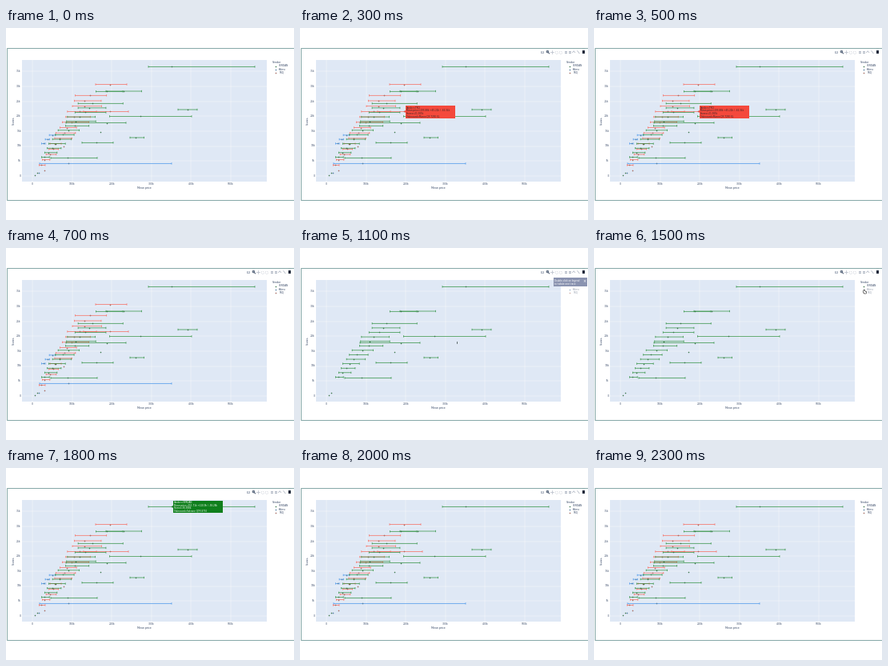
A matplotlib script that plays this animation: 360x240 px, repeating every 2.4 s.

```python
import matplotlib.pyplot as plt
import numpy as np
from matplotlib.animation import FuncAnimation
from matplotlib.collections import LineCollection
from matplotlib.patches import Circle, Polygon, Rectangle

W, H, DPI = 360, 240, 100
INK, PANEL, EDGE = "#3b4c6a", "#dfe8f5", "#86a8a8"
GREEN, RED, BLUE = "#2f9140", "#fa6a5c", "#4a97ea"
ZERO_X, ZERO_Y = 33, 184.8

rng = np.random.default_rng(7)
fig = plt.figure(figsize=(W / DPI, H / DPI), dpi=DPI, facecolor="white")
ax = fig.add_axes([0, 0, 1, 1])
ax.set(xlim=(0, W), ylim=(H, 0))
ax.axis("off")


def px(v):
    return v * 72 / DPI


def text(x, y, s, size=3.0, color=INK, ha="left", z=5, **kw):
    return ax.text(x, y, s, fontsize=px(size), color=color, ha=ha, va="center",
                   family="DejaVu Sans", zorder=z, **kw)


def box(x0, y0, x1, y1, color, z=1):
    return ax.add_patch(Rectangle((x0, y0), x1 - x0, y1 - y0, fc=color,
                                  ec="none", lw=0, zorder=z))


def line(xs, ys, color, width=1.0, z=2):
    return ax.plot(xs, ys, color=color, lw=px(width), zorder=z)[0]


def dots(pts, color, z=5):
    return ax.plot(*zip(*pts), "o", ms=px(1.2), mfc=color, mec="#3a4d48",
                   mew=px(0.25), zorder=z)[0]


def cloud(n, start, end, left, right):
    """Bars (low, mean, high, y) along a line; spread grows with the price."""
    means, ys = np.linspace(start, end, n).T
    means = means + rng.normal(0, 0.04, n) * (means - ZERO_X)
    reach = means - ZERO_X
    low = means - reach * left * rng.uniform(0.8, 1.2, n)
    high = means + reach * right * rng.uniform(0.7, 1.3, n)
    return list(zip(low, means, high, ys))


def series(bars, color, extra=(), z=3):
    segs = []
    for lo, _, hi, y in bars:
        segs.append([(lo, y), (hi, y)])
        segs += [[(x, y - 1.2), (x, y + 1.2)] for x in (lo, hi)]
    bar_lines = LineCollection(segs, colors=color, linewidths=px(0.7), zorder=z)
    bar_lines.set_snap(False)
    ax.add_collection(bar_lines, autolim=False)
    return [bar_lines, dots([(m, y) for _, m, _, y in bars] + list(extra), color, z + 0.5)]


def tooltip(x0, y0, x1, y1, color, ink, tip, rows):
    tx, ty = tip
    arrow = [tip, (x0 + 0.2, ty - 1.7), (x0 + 0.2, ty + 1.7)]
    parts = [box(x0, y0, x1, y1, color, 7),
             ax.add_patch(Polygon(arrow, fc=color, ec="none", zorder=7))]
    step = (y1 - y0 - 0.6) / len(rows)
    parts += [text(x0 + 1.2, y0 + 0.3 + step * (i + 0.5), r, 2.7, ink, z=8)
              for i, r in enumerate(rows)]
    return parts


def modebar():
    grey, dark, y = "#b3bac6", "#4b5a70", 30.2
    parts = [box(301.3, y - 1.4, 304.9, y + 1.4, grey),
             ax.add_patch(Circle((303.1, y), 0.8, fc="white", ec="none", zorder=2)),
             ax.add_patch(Circle((309.4, y - 0.6), 1.3, fc="#9aa5b5", ec=dark,
                                 lw=px(0.8), zorder=2)),
             line([310.3, 311.6], [y + 0.3, y + 1.7], dark),
             line([313.2, 316.8], [y, y], grey, 0.7),
             line([315, 315], [y - 1.8, y + 1.8], grey, 0.7)]
    for x in (320, 325.5):
        parts.append(ax.add_patch(Rectangle((x - 1.5, y - 1.6), 3, 3, fc="none", ec=grey,
                                            lw=px(0.6), ls=":", zorder=2)))
    for x in (332, 337):
        parts.append(box(x - 1.5, y - 1.5, x + 1.5, y + 1.5, grey))
        parts.append(line([x - 0.9, x + 0.9], [y, y], "white", 0.6, 3))
    parts.append(line([340.6, 342.2, 343.8], [y + 0.4, y - 1.4, y + 0.4], grey, 0.8))
    parts.append(line([346.8, 348, 349.2], [y - 1.6, y, y + 1.6], grey, 0.8))
    parts.append(box(352.6, y - 2, 356.4, y + 1.8, "#1f2a3c"))
    return parts


def show(parts, on):
    for p in parts:
        p.set_visible(on)


# panel, grid and axes
box(20, 40, 326, 192, PANEL, 0)
for k in range(8):
    if k < 6:
        x = ZERO_X + 49.6 * k
        line([x, x], [40, 192], "white", 0.4, 1)
        text(x, 195, f"{k}00k" if k else "0", ha="center")
    y = ZERO_Y - 18.65 * k
    line([20, 326], [y, y], "white", 0.4, 1)
    text(18.8, y, f"{5 * k}k" if k else "0", ha="right")
text(173, 200.4, "Mean price", 3.2, ha="center")
text(9.8, 116, "Scores", 3.2, ha="center", rotation=90)

# each vendor: a rising cloud plus its outliers
green_far = [(178, 207, 311, 48.4), (112.5, 126, 146, 79.3), (125, 147, 169.5, 79),
             (215, 227, 239, 102), (129.5, 168, 232, 110.4), (75, 126, 150, 118.5),
             (95, 113, 134, 143.3), (155, 162, 172.5, 137), (56, 77, 114, 162.4)]
red_far = [(112, 130, 151, 70.5), (97, 130, 153, 104.4)]
wide = [(42, 77.5, 207, 169.4)]

series(cloud(13, (48, 161.4), (108, 94.3), 0.24, 0.42) + green_far, GREEN,
       [(38.5, 181), (36, 184.2), (117.5, 130.3)], 4)
others = (series(cloud(3, (47, 144.4), (58, 133.9), 0.15, 0.15) + wide, BLUE,
                 [(40.5, 180.7)])
          + series(cloud(14, (44, 171.4), (104, 84.3), 0.22, 0.35) + red_far, RED,
                   [(48, 178.3), (72, 148.2)]))

# legend
first = [text(333, 43.2, "Vendor", 3.2), text(341, 47.5, "VERDAN"),
         dots([(337, 47.5)], GREEN)]
rest = []
for y, name, color in ((51.6, "Kolmo", BLUE), (55.7, "TRQ", RED)):
    rest += [text(341, y, name), dots([(337, y)], color)]

bar = modebar()
red_tip = tooltip(132, 97, 193.7, 112.6, "#f4493c", "#3b2626", (130, 104.4),
                  ["Vendor=TRQ", "Mean price=195.88k +45.22k / -64.34k",
                   "Scores=21.505k", "Videocard=Maron QX 7250 XL"])
green_tip = tooltip(209, 41, 270.8, 56, "#0f7f1c", "#eef7ee", (207, 48.4),
                    ["Vendor=VERDAN", "Mean price=351.71k +210.9k / -58.28k",
                     "Scores=36.588k", "Videocard=Solvane QTR 8700"])
notice = [box(316.5, 36.6, 359, 48, "#8a93b0", 7),
          text(318.5, 40.8, "Double-click on legend", 2.8, "white", z=8),
          text(318.5, 44.6, "to isolate one trace", 2.8, "white", z=8),
          text(355.2, 41.2, "×", 5, "white", ha="center", z=8)]
speck = [line([196.3, 196.3], [117.4, 119.2], "#3c4a4a", 0.8)]
hand = [ax.add_patch(Polygon([(337.2, 52.3), (338.4, 52.3), (338.6, 54), (340.6, 54.5),
                              (340.2, 57), (337.8, 57), (336.3, 54.8)],
                             fc="white", ec="#222222", lw=px(0.6), zorder=9))]

# window edge
ax.add_patch(Rectangle((0.5, 24.5), 359, 190, fc="none", ec=EDGE, lw=px(1), zorder=10))


def draw(i):
    alone, noted = 9 <= i < 16, 9 <= i < 14
    show(others, not alone)
    show(bar, 1 <= i < 22)
    show(red_tip, 2 <= i < 6)
    show(green_tip, 17 <= i < 20)
    show(notice, noted)
    show(first, not noted)
    show(speck, 10 <= i < 13)
    show(hand, 14 <= i < 17)
    for p in rest:
        p.set_alpha(0.5 if alone else 1)
    return []


anim = FuncAnimation(fig, draw, frames=24, interval=100, repeat=True,
                     repeat_delay=0, blit=False)
plt.show()
```
